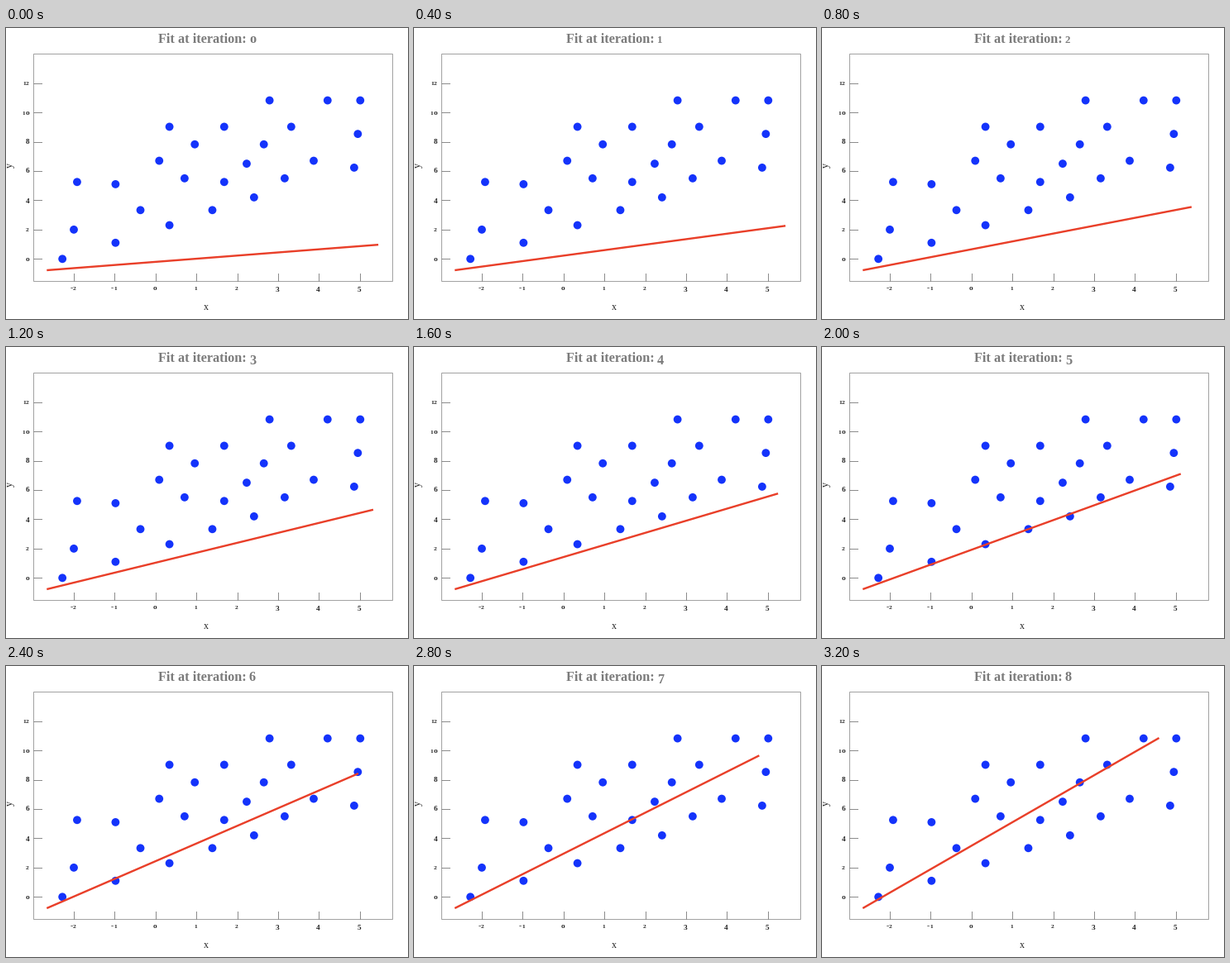
Animation of 486 by 352 pixels, one loop 3.6 s. Source, as a matplotlib script:

```python
import matplotlib.pyplot as plt
import numpy as np
from matplotlib.animation import FuncAnimation
from matplotlib.patches import Circle, Rectangle

W, H, DPI = 486, 352, 64
PT = 72 / DPI  # points per pixel
STEPS = 9

GRAY, INK, BLUE, RED = "#7b7b7b", "#262626", "#1433fb", "#e93f29"

# samples to fit, grouped by y value
SAMPLES = {
    10.82: (2.79, 4.21, 5.01), 9.02: (0.34, 1.68, 3.32), 8.53: (4.95,),
    7.82: (0.96, 2.65), 6.7: (0.09, 3.87), 6.5: (2.23,), 6.23: (4.86,),
    5.5: (0.71, 3.16), 5.25: (-1.92, 1.68), 5.1: (-0.98,), 4.2: (2.41,),
    3.33: (-0.37, 1.39), 2.3: (0.34,), 2: (-2,), 1.1: (-0.98,), 0: (-2.28,),
}

fig = plt.figure(figsize=(W / DPI, H / DPI), dpi=DPI, facecolor="white")
ax = fig.add_axes([0, 0, 1, 1])
ax.set(xlim=(0, W), ylim=(H, 0))
ax.axis("off")


def px_x(v):
    return 180.8 + 49.4 * v


def px_y(v):
    return 279.3 - 17.72 * v


def label(x, y, s, size, **kw):
    kw = {"va": "baseline", "color": INK, **kw}
    return ax.text(x, y, s, fontsize=size * PT, family="Liberation Serif", **kw)


def old_style(c, size):
    """Glyph, font size, drop and advance of an old-style numeral."""
    if c == "0":
        return "o", size, 0, 0.5 * size
    if c in "12":
        return c, 0.8 * size, 0, 0.42 * size
    if c == "-":
        return c, size, 0, 0.34 * size
    return c, size, (0.15 * size if c in "34579" else 0), 0.5 * size


def number(s, x, y, size, align):
    glyphs = [old_style(c, size) for c in s]
    x -= align * sum(g[3] for g in glyphs)
    for c, glyph_size, drop, advance in glyphs:
        label(x, y + drop, c, glyph_size, weight="bold")
        x += advance


def stroke(xs, ys, color, width, **kw):
    return ax.plot(xs, ys, color=color, lw=width * PT, **kw)[0]


ax.add_patch(Rectangle((32.5, 31), 434, 274.5, fill=False, ec="#a2a2a2", lw=PT))
for v in range(-2, 6):
    x = px_x(v)
    stroke([x, x], [296.5, 305.5], "#8c8c8c", 1)
    number(str(v), x - 1, 317.3, 9.2, 0.5)
for v in range(0, 13, 2):
    y = px_y(v)
    stroke([32.5, 42.5], [y, y], "#8c8c8c", 1)
    number(str(v), 28, y + 2.4, 9.2, 1)

label(241.5, 341, "x", 12, ha="center")
label(5, 166, "y", 12, ha="center", va="center", rotation=90)

for v, xs in SAMPLES.items():
    for u in xs:
        ax.add_patch(Circle((px_x(u), px_y(v)), 4.9, fc=BLUE, lw=0, zorder=3))

fit = stroke([], [], RED, 2.4, zorder=4, solid_capstyle="butt")

title = dict(color=GRAY, weight="bold")
label(184, 18.5, "Fit at iteration: ", 16.3, **title)
count = label(294, 18.5, "", 16.3, **title)


def draw(i):
    # the line swings up about its left end, growing slightly
    angle = np.radians(np.interp(i, [0, 2, 4, 6, 8], [4.4, 10.9, 16.5, 23.4, 29.9]))
    length = 402 + 1.4 * i
    x, y = 49.3, 293
    fit.set_data([x, x + length * np.cos(angle)], [y, y - length * np.sin(angle)])
    glyph, size, drop, _ = old_style(str(i), 16.3)
    count.set_text(glyph)
    count.set_fontsize(size * PT)
    count.set_y(18.5 + drop)
    return fit, count


anim = FuncAnimation(fig, draw, frames=STEPS, interval=400,
                     repeat=True, repeat_delay=0, blit=False)
plt.show()
```
